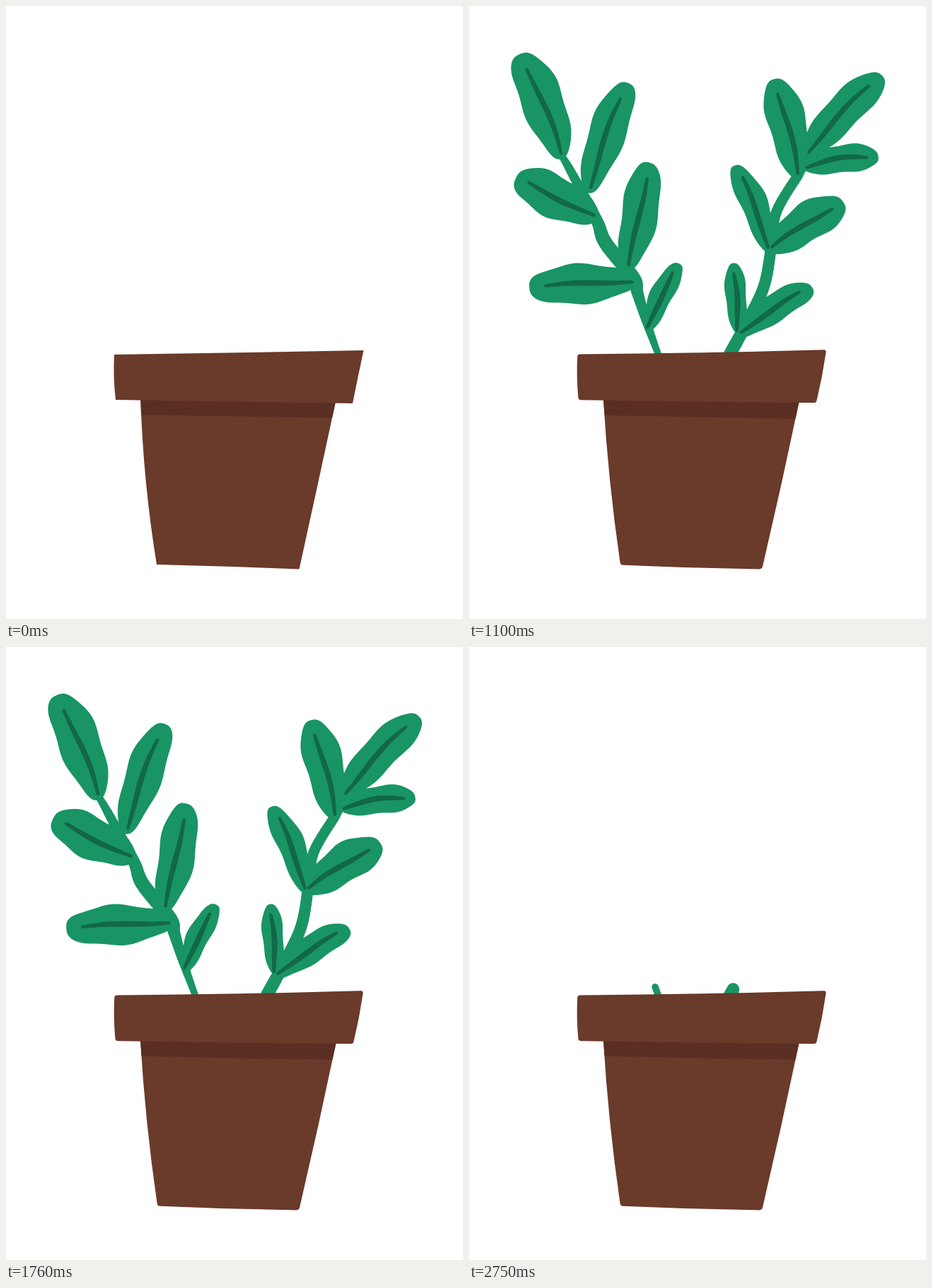
An HTML page with a canvas that plays this animation: 646x867 px, repeating every 2860 ms.

```html
<!DOCTYPE html>
<html lang="en">
<head>
<meta charset="utf-8">
<title>Growing plant</title>
<style>
html, body { margin: 0; width: 100%; height: 100%; overflow: hidden; background: #fff; }
canvas { display: block; }
</style>
</head>
<body>
<canvas id="stage" width="646" height="867"></canvas>
<script>
const ctx = document.getElementById('stage').getContext('2d');
const GREEN = '#199465', VEIN = '#126848', CLAY = '#6a3a2a', SHADE = '#5b2e23';
const STEP = 110, COUNT = 26;

const parse = text => text.split(' ').map(p => p.split(',').map(Number));
const lerp = (a, b, t) => a.map((v, i) => v + (b[i] - v) * t);
const wave = t => Math.sin(Math.PI * t);

// Repeatable random number from -1 to 1
function noise(seed) {
  const v = Math.sin(seed * 12.9898 + 4.1) * 43758.5453;
  return (v - Math.floor(v)) * 2 - 1;
}

// Direction, normal and length of the line from a to b
function axis(a, b) {
  const dx = b[0] - a[0], dy = b[1] - a[1], len = Math.hypot(dx, dy);
  return { d: [dx / len, dy / len], n: [-dy / len, dx / len], len };
}

// Smooth curve through the points, as a list of x,y,radius
function spine(pts, radius) {
  const out = [], last = pts.length - 1, at = i => pts[Math.max(0, Math.min(last, i))];
  for (let s = 0; s <= last * 8; s++) {
    const i = Math.min(last - 1, s >> 3), t = s / 8 - i;
    const [a, b, c, d] = [at(i - 1), at(i), at(i + 1), at(i + 2)];
    const mix = k => b[k] + t / 2 * (c[k] - a[k] + t * (2 * a[k] - 5 * b[k] + 4 * c[k] - d[k]
      + t * (3 * (b[k] - c[k]) + d[k] - a[k])));
    out.push([mix(0), mix(1), radius(s / last / 8)]);
  }
  return out;
}

function limb(pts, colour) {
  ctx.strokeStyle = colour;
  ctx.lineCap = 'round';
  for (let i = 1; i < pts.length; i++) {
    const a = pts[i - 1], b = pts[i];
    ctx.lineWidth = a[2] + b[2];
    ctx.beginPath();
    ctx.moveTo(a[0], a[1]);
    ctx.lineTo(b[0], b[1]);
    ctx.stroke();
  }
}

const stems = [
  { pts: spine(parse('268,494 252,450 238,405 232,384 193,335 180,302 144,234 130,210'), t => 4.5 + 5.5 * wave(t) ** 1.5), low: 475, rise: 240 },
  { pts: spine(parse('368,494 397,440 418,393 428,335 435,290 466,238'), t => 9 - 2 * t), low: 479, rise: 232 }
];

// foot x, foot y, tip x, tip y, half width, bend to the right
const leaves = parse('132,216,74,66,30,4 168,264,225,109,26,-3 182,300,66,241,30,0 224,374,252,221,26,2 '
  + '238,388,86,397,28,0 252,460,297,365,16,-4 466,244,432,102,27,3 474,212,582,98,25,-4 472,228,580,213,20,-4 '
  + '424,348,374,226,19,6 424,346,530,277,27,-4 381,464,375,365,15,0 380,466,486,398,20,-5');

// A rounded leaf with lobed sides; each pose redraws it a little differently
function leaf([fx, fy, tx, ty, half, bend], index, pose) {
  const shake = k => pose && 1.5 * noise(index * 17 + pose * 5 + k);
  const foot = [fx, fy], tip = [tx + shake(1), ty + shake(2)];
  const { d, n, len } = axis(foot, tip);
  const point = (t, off) => [0, 1].map(k => foot[k] + d[k] * len * t + n[k] * (bend * wave(t) + off));
  const edge = (t, side) => {
    const lobes = 1 + 0.07 * Math.sin(t * 12 + 3 * noise(index * 2 + side) + shake(3) / 3);
    return point(t, side * half * lobes * Math.max(0, wave(t ** 1.2)) ** 0.36);
  };
  const shape = new Path2D();
  for (const side of [-1, 1]) {
    for (let i = 0; i <= 30; i++) {
      const t = (1 - Math.cos(Math.PI * i / 30)) / 2;
      shape.lineTo(...edge(side < 0 ? t : 1 - t, side));
    }
  }
  const rib = [];
  for (let t = 0.05; t < 0.86; t += 0.2) rib.push(point(t, 2 * Math.sin(t * 6 + index)));
  return { foot, shape, vein: spine(rib, t => 2 + 1.8 * wave(t)) };
}

const poses = [0, 1, 2].map(pose => leaves.map((l, i) => leaf(l, i, pose)));

// Hand-cut four-sided shape: bowed edges, corners rounded except in the first pose
function rough(text, pose, seed, lean = 0) {
  const corners = parse(text).map((p, i) =>
    p.map((v, k) => v + (pose && 1.3 * noise(seed + pose * 9 + i * 2 + k))));
  const round = pose ? 4 : 0, path = new Path2D();
  const near = (a, b) => lerp(a, b, round / axis(a, b).len);
  path.moveTo(...near(corners[0], corners[1]));
  corners.forEach((a, i) => {
    const b = corners[(i + 1) % 4], c = corners[(i + 2) % 4], { n } = axis(a, b);
    const bow = (i === 3 ? -lean : 0) + (pose ? 3 : 1) * noise(seed + pose * 31 + i);
    const mid = lerp(a, b, 0.5).map((v, k) => v + n[k] * bow);
    path.quadraticCurveTo(...mid, ...near(b, a));
    path.quadraticCurveTo(...b, ...near(b, c));
  });
  return path;
}

const pots = [0, 1, 2].map(pose => ({
  rim: rough('153,493 505.5,487 490,562 155,557', pose, 3, 2),
  band: rough('170,545 490,548 490,583 170,578', pose, 11),
  body: rough('190,550 467,555 414.5,796.5 213,790', pose, 23, 8)
}));

function fill(path, colour) {
  ctx.fillStyle = colour;
  ctx.fill(path);
}

// Run drawing code scaled around one point
function scaled([x, y], k, paint) {
  ctx.save();
  ctx.translate(x, y);
  ctx.scale(k, k);
  ctx.translate(-x, -y);
  paint();
  ctx.restore();
}

function drawStem({ pts, low, rise }, stage) {
  const top = stage > 5 ? 0 : low - rise * ((stage - 1) / 4) ** 1.15;
  limb(pts.filter(p => p[1] >= top), GREEN);
}

function drawPot({ rim, band, body }) {
  fill(body, CLAY);
  ctx.save();
  ctx.clip(body);
  fill(band, SHADE);
  ctx.restore();
  fill(rim, CLAY);
}

function draw(stage) {
  const pose = stage % 3;
  ctx.fillStyle = '#fff';
  ctx.fillRect(0, 0, 646, 867);
  if (stage > 0) stems.forEach(s => drawStem(s, stage));
  if (stage > 5) {
    const size = Math.min(1, 0.23 + (stage - 6) * 0.39);
    for (const l of poses[pose]) scaled(l.foot, size, () => fill(l.shape, GREEN));
    for (const l of poses[pose]) scaled(l.foot, size, () => limb(l.vein, VEIN));
  }
  drawPot(pots[pose]);
}

// Grow for half the loop, then play the same poses backwards
let shown = -1;
function tick() {
  const n = Math.floor(performance.now() / STEP) % COUNT;
  const stage = Math.min(n, COUNT - n);
  if (stage !== shown) draw(shown = stage);
  requestAnimationFrame(tick);
}
tick();
</script>
</body>
</html>
```
